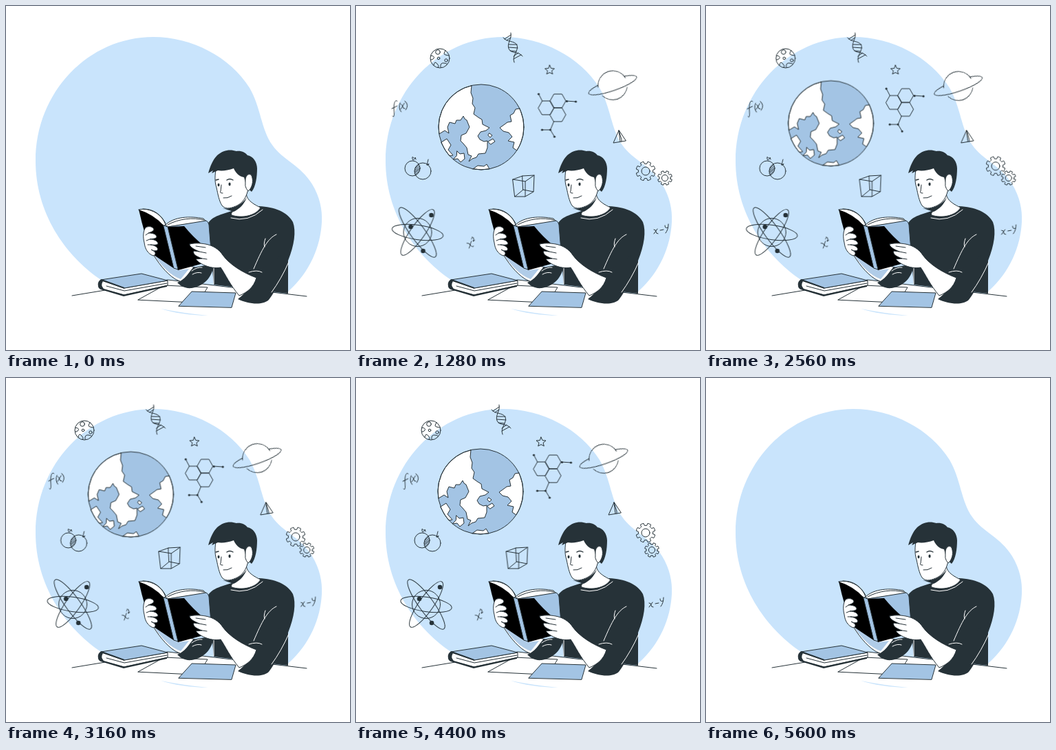
These frames come from a looping animation (500x500 px, 5800 ms). An HTML page:

```html
<!DOCTYPE html>
<html lang="en">
<head>
<meta charset="utf-8">
<title>Reading</title>
<style>
@property --drift { syntax: '<number>'; inherits: true; initial-value: 1; }
@property --entry { syntax: '<number>'; inherits: true; initial-value: 3.4; }
html, body { margin: 0; width: 100%; height: 100%; overflow: hidden; background: #fff; }
svg { display: block; width: 100vw; height: 100vh; }
.ink { fill: none; stroke: #263238; stroke-width: 1; stroke-linecap: round; stroke-linejoin: round; }
.dark { fill: #263238; }
.dot { fill: #263238; stroke: none; }
.sea { fill: #a3c4e4; }
.sky { fill: #c9e4fc; }
.white { fill: #fff; }
.crease { fill: none; stroke: #fff; stroke-width: 1; stroke-linecap: round; }

/* x, y: resting place; dx, dy: slow drift; ex, ey: direction of entry */
.flight { animation: drift 5.8s linear infinite, entry 5.8s linear infinite; }
.item {
  transform: translate(
    calc(var(--x) + var(--drift) * var(--dx) + var(--entry) * var(--ex)),
    calc(var(--y) + var(--drift) * var(--dy) + var(--entry) * var(--ey)));
  animation: show 5.8s linear infinite;
}
.high { animation-name: showHigh; }
@keyframes drift {
  0%, 22.07% { --drift: 1; }
  44.14% { --drift: .51; }
  64.83% { --drift: .26; }
  75.86% { --drift: 0; }
  82.76% { --drift: -.12; animation-timing-function: cubic-bezier(.4, 0, .8, .5); }
  96%, 100% { --drift: 1; }
}
@keyframes entry {
  0% { --entry: 3.4; animation-timing-function: cubic-bezier(.333, .55, .667, 1); }
  22.07% { --entry: 0; }
  82.76% { --entry: 0; animation-timing-function: cubic-bezier(.4, 0, .8, .5); }
  96%, 100% { --entry: 1; }
}
@keyframes show {
  0%, .6% { opacity: 0; }
  3.5%, 91% { opacity: 1; }
  96%, 100% { opacity: 0; }
}
@keyframes showHigh {
  0%, .6% { opacity: 0; }
  3.5%, 89% { opacity: 1; }
  93.1%, 100% { opacity: 0; }
}
</style>
</head>
<body>
<svg viewBox="0 0 500 500">
  <path class="sky" d="M214 45C270 45 326 74 354 119C370 146 371 180 387 202C402 224 428 231 445 259C456 277 460 296 459 314C457 350 442 386 411 414C380 440 330 450 293 450C235 446 180 432 138 398C85 362 43 300 43 225C43 125 120 45 214 45Z"/>

  <g class="ink flight">
    <g class="item" data-move="181 165 1 11 -8.5 51">
      <circle class="sea" r="62" stroke="none"/>
      <path class="white" d="M-14-60.4L-15-50-12-42-13-34-9-28-11-19-4-14 1-11 2-4 8-1 12 1 7 5-1 7-5 13-2 18 4 21 9 20 9 30 6 38-4 39-7 44-13 46-18 50-14 42-19 40-21 30-26 24-30 20-29 12-22 9-17 0-21-10-24-12-26-16-30-10-36-10-38-5-46-7-49 0-47 9-53 5-61.2 10A62 62 0 0 1-14-60.4Z"/>
      <path class="white" d="M55.8-27L50-26 47-20 42-17 44-8 38-7 34-4 27 1 32 6 40 8 45 14 39 20 48 22 46 30 51.8 34A62 62 0 0 0 55.8-27Z"/>
      <path class="white" d="M12 9L16 12 13 15 10 12ZM10 21L17 17 20 21 14 25ZM-58 22L-50 17-44 26-48 33-41 41-46 42-52 34ZM-35 35L-31 39-25 38-24 46-30 51-34 46-41 47-36 42ZM-12 60.8L-5 56 4 57 8 54 12 60.8A62 62 0 0 1-12 60.8Z"/>
      <circle r="62"/>
    </g>

    <g class="item high" data-move="109 76 13 0 45 14">
      <circle r="14"/>
      <circle cx="-3" cy="-9" r="3.3"/><circle cx="-2" cy="0" r="1.8"/><circle cx="9" cy="3" r="2.2"/>
      <path d="M-13-4Q-7-3-9 0T-13 2M-9 10Q-8 3-4 8T-3 13M1 13Q0 6 6 7T10 9M8-11Q4-6 8-5T13-4"/>
    </g>

    <g class="item high" data-move="211 60 17 0 31 8">
      <path d="M-14-14C-9-7 3-10 6-3C9 5-2 12 2 22M-3-21C-1-12-9-6-6 2C-3 10 8 5 14 13M-12-12L-3-18M-9-10L-3-14M-6-4L6-4M-6 0L7 1M-4 5L5 6M1 13L8 8M1 17L12 11"/>
    </g>

    <path class="item high" data-move="269 93 12.5 0 28.5 9" d="M0-7L2-2.4 7-2 3 1.2 4.3 6 0 3.6-4.3 6-3 1.2-7-2-2-2.4Z"/>

    <g class="item high" data-move="360 117 13 -2 36 4">
      <path transform="rotate(-19)" d="M20-6.7A37 8 0 1 1-20-6.7M-21-4A21.5 21.5 0 0 1 21-4M-19 10A21.5 21.5 0 0 0 19 10"/>
    </g>

    <g class="item" data-move="79 149 -16 -1 -28 11">
      <path transform="rotate(-6)" d="M-2-10C-5-13-7-8-8 0C-8 8-9 15-11 11M-11 0L-3-3M2-7Q-2 0 2 6M3-5Q5-4 5-1T8 2M8-6L2 2M9-9Q15-3 9 4"/>
    </g>

    <g class="item" data-move="104 236 -14 0 -53 12">
      <circle cx="-8" r="11"/><circle cx="7" cy="4" r="12"/>
      <path d="M-4 0L1-5M-5 3L2-3M-5 5L3-1M-5 7L3 1M-4 9L2 4M-6-15Q-9-19-8-14T-4-16L-3-13M15-13L13-5Q18-8 15-5L13-5"/>
    </g>

    <g class="item" data-move="102 329 -12.5 0 -30 24">
      <circle r="20.5"/>
      <ellipse rx="37.5" ry="10.5" transform="rotate(8)"/>
      <ellipse rx="44" ry="10.5" transform="rotate(54)"/>
      <ellipse rx="40" ry="10.5" transform="rotate(-55)"/>
      <path class="dot" d="M16.7-25a3.3 3.3 0 1 1 6.6 0a3.3 3.3 0 1 1-6.6 0M-13.3-8a3.3 3.3 0 1 1 6.6 0a3.3 3.3 0 1 1-6.6 0M4.7 27a3.3 3.3 0 1 1 6.6 0a3.3 3.3 0 1 1-6.6 0"/>
    </g>

    <g class="item" data-move="179 343 -12 0 -23 13">
      <path transform="rotate(-16)" d="M-6 0Q-3 0-2 4T2 7M1-1L-5 8M2-4Q4-8 5-5T3 0L6-1"/>
    </g>

    <g class="item" data-move="278.5 142 7 16 9 76">
      <path id="hex" d="M-20.5-10L-14.8-20-3.2-20 2.5-10-3.2 0-14.8 0Z"/>
      <use href="#hex" x="17" y="-10"/><use href="#hex" x="17" y="10"/>
      <path d="M-14.8-20L-20-30M19.5-20L34-19M2 10L-3 22L-15 22M-3 22L3 32"/>
      <g class="dot">
        <circle cx="-20" cy="-30" r="1.6"/><circle cx="34" cy="-19" r="1.6"/><circle cx="21" cy="-19.5" r="1.5"/>
        <circle cx="-15" cy="22" r="1.6"/><circle cx="-3" cy="22" r="1.5"/><circle cx="3" cy="32" r="1.6"/>
      </g>
    </g>

    <path class="item" data-move="376 190 7 0 22 9" d="M-1-9L-9 9 9 6ZM-1-9L1 7M-1-9L3 4 3 7"/>
    <g class="item" data-move="421 225 0 15 15 48"><path data-gear="14"/><circle r="6"/></g>
    <g class="item" data-move="430 250 19 0 40 18"><path data-gear="10.5"/><circle r="4.6"/></g>
    <path class="item" data-move="233.5 262 9.5 0 28 13" d="M-15-10L3-7 3 15-12 15ZM-1-15L16-16 15 8 0 5ZM-15-10L-1-15M3-7L16-16M3 15L15 8M-12 15L0 5"/>
    <path class="item" data-move="436 327 7 -2 12 14" d="M-10 0Q-7 0-7 3T-4 6M-5-1L-10 6M-1 1L4 0M6-6Q6-1 10-3M11-8Q11 0 7 5"/>
  </g>

  <!-- table -->
  <path class="white" d="M96 421L235 398 437 422 465 475H60Z"/>
  <path class="sky" d="M225 440Q260 447 294 450Q253 449 225 440Z"/>
  <path class="ink" d="M96 421L235 398 437 422"/>
  <g class="ink">
    <path class="white" d="M192 427L230 406 293 409 279 431Z"/>
    <path class="sea" d="M251 436L270 415 334 417 328 438Z"/>
    <path class="white" d="M139 399L172 410 235 399V406L171 420 138 411Z"/>
    <path class="sea" d="M138 398L197 389 235 399 172 410Z"/>
    <path d="M146 407L172 414 234 403"/>
  </g>
  <path class="dark" d="M139 397Q132 400 134 408Q135 412 141 413L171 422 234 408V406L172 419.5 142 411Q137 406 141 400L172 411V409Z"/>

  <!-- reader -->
  <path class="dark" d="M333 296C318 302 297 305 293 318L297 350 302 405 410 418V370C419 348 422 327 417 314C409 299 390 292 368 291Z"/>
  <path class="dark" d="M411 355C404 388 392 415 382 427C372 436 352 433 337 426C348 418 358 405 364 388Z"/>
  <g class="ink">
    <path class="white" d="M349 268C349 278 351 284 370 293C363 305 343 309 328 304C326 301 330 298 334 296L330 287Z"/>
    <path class="white" d="M305 238C303 250 304 258 306 264C308 274 310 284 314 290C319 297 330 293 336 290C344 286 349 278 351 270L358 245 330 230Z"/>
  </g>
  <path class="dark" d="M315 294C325 296 342 291 350 278C346 289 339 295 331 299Z"/>
  <path class="dark" d="M294 243C297 232 301 223 307 217C316 209 326 208 335 211C342 210 348 213 351 217C359 218 365 227 365 236C365 248 363 263 357 270L350 264 346 249C338 248 333 241 331 236C323 239 314 240 308 239L299 243 301 239Z"/>
  <g class="ink">
    <path class="white" d="M348 252C349 243 357 242 358 250C360 259 355 267 352 269Q349 266 348 262Z"/>
    <path d="M313 260L312 269Q310 272 315 272M316 279Q322 280 328 276"/>
    <path stroke-width="1.4" d="M305 253L309 252M321 253Q325 250 330 253"/>
    <path d="M326 306Q349 315 374 294"/>
  </g>
  <ellipse class="dark" cx="309" cy="260" rx="1.5" ry="2.3"/>
  <ellipse class="dark" cx="325" cy="259" rx="1.6" ry="2.4"/>
  <path class="crease" d="M327 308Q352 315 373 296M393 332C380 338 372 354 360 382M377 338Q374 346 376 350M411 372Q400 397 386 416M353 387Q365 383 372 387M302 377V404"/>

  <!-- far arm -->
  <path class="ink white" d="M211 356C220 372 232 388 246 397L257 402 277 381 246 370Z"/>
  <path class="sea" d="M215 361L245 373 251 384 266 382 254 397C240 392 225 378 215 361Z" opacity=".85"/>
  <path class="dark" d="M249 402C260 398 266 387 272 380L302 375C301 391 290 407 270 410C259 411 253 406 249 402Z"/>
  <path class="crease" d="M270 385Q278 379 285 380M271 390Q278 386 284 388"/>

  <!-- open book -->
  <g class="ink">
    <path class="white" d="M193 296C211 292 226 302 232 318L230 319Z"/>
    <path class="white" d="M232 318C244 306 268 305 287 309L291 313 236 321Z"/>
    <path d="M199 295C215 296 226 304 232 316M235 318C251 309 272 307 288 311"/>
    <path class="sea" d="M235 321L291 312Q294 313 295 318L299 369 250 383Z"/>
  </g>
  <path d="M193 296Q215 303 229 319L245 382 212 360Q201 332 193 296Z"/>
  <path d="M235 321L259 320Q271 335 288 349L287 374 250 384Z"/>
  <path class="ink sea" d="M229 319L235 321 250 383 244 381Z"/>

  <!-- hands -->
  <g class="ink">
    <path class="white" d="M203 322C208 319 214 321 215 325C214 328 209 329 207 330C214 330 219 332 219 336C217 339 211 338 209 339C216 339 221 342 221 346C218 348 213 347 210 347C217 348 222 351 220 355C216 357 212 355 211 354C218 357 219 361 214 363C206 360 202 353 201 344C199 336 199 327 203 322Z"/>
    <path d="M207 330L203 333M209 339L204 341M210 347L206 347"/>
    <path class="white" d="M267 346C276 344 284 345 290 346C301 348 310 354 315 362C325 376 345 388 364 395C360 409 351 416 339 421C326 406 319 390 312 380C297 383 280 374 276 368L285 367C276 364 271 360 273 356L281 357C274 354 266 350 267 346Z"/>
    <path d="M281 357L291 359M285 367L292 368M276 349L290 351"/>
  </g>
</svg>
<script>
const names = ['x', 'y', 'dx', 'dy', 'ex', 'ey'];
for (const el of document.querySelectorAll('[data-move]')) {
  el.classList.add('item');
  el.dataset.move.split(' ').forEach((v, i) => el.style.setProperty('--' + names[i], v + 'px'));
}

// Eight teeth, each an outer and an inner arc joined by short flanks
function gear(r) {
  const at = (rad, a) => `${(rad * Math.cos(a)).toFixed(2)} ${(rad * Math.sin(a)).toFixed(2)}`;
  const low = r * 0.76;
  let d = '';
  for (let i = 0; i < 8; i++) {
    const a = ((i + 0.5) * Math.PI) / 4;
    d += `${i ? 'L' : 'M'}${at(low, a - 0.24)}L${at(r, a - 0.18)}`;
    d += `A${r} ${r} 0 0 1 ${at(r, a + 0.18)}L${at(low, a + 0.24)}`;
    d += `A${low} ${low} 0 0 1 ${at(low, a + Math.PI / 4 - 0.24)}`;
  }
  return d + 'Z';
}
for (const el of document.querySelectorAll('[data-gear]')) {
  el.setAttribute('d', gear(+el.dataset.gear));
}
</script>
</body>
</html>
```
